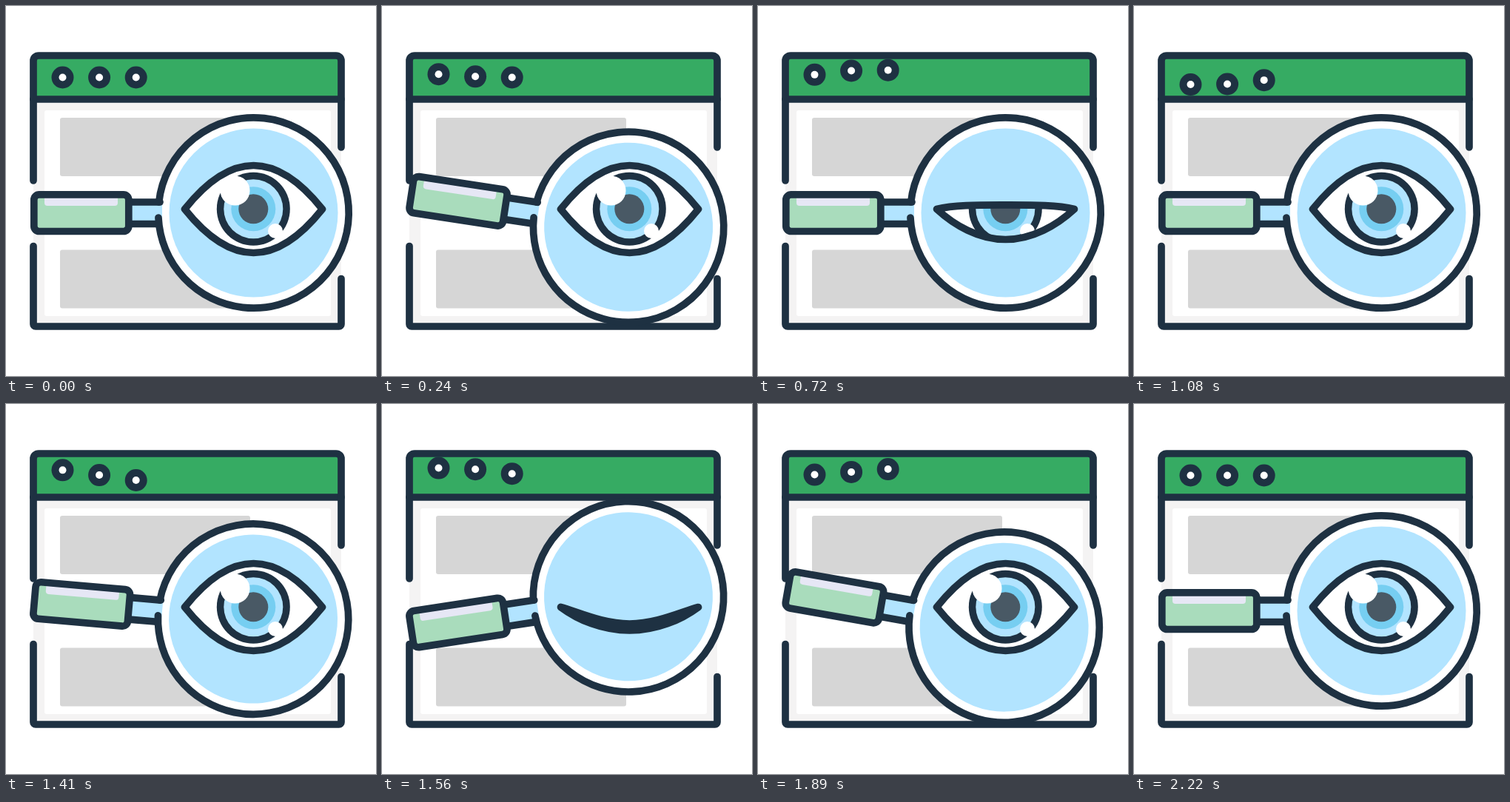
An HTML page with a canvas that plays this animation: 500 by 500 pixels, repeating every 2.25 s.

```html
<!DOCTYPE html>
<html lang="en">
<head>
<meta charset="utf-8">
<title>Search and view</title>
<style>
  html, body { margin: 0; width: 100%; height: 100%; overflow: hidden; background: #fff; }
  canvas { display: block; width: 500px; height: 500px; }
</style>
</head>
<body>
<canvas id="stage" width="500" height="500"></canvas>
<script>
const ctx = document.getElementById('stage').getContext('2d');
const LOOP = 2250, STEP = 30, ACTIVE = 2160;
const NAVY = '#1e3142', GREEN = '#36ab63', MINT = '#a9dcbc', SKY = '#b2e4ff',
      AQUA = '#76cef1', SLATE = '#495965', GREY = '#d6d6d6', PALE = '#f4f3f3', WHITE = '#fff';

const clamp01 = x => Math.min(1, Math.max(0, x));
const mix = (a, b, p) => a + (b - a) * p;
const ease = p => (1 - Math.cos(Math.PI * clamp01(p))) / 2;

// Eased value through [time, value] keys.
function track(keys, t) {
  for (let i = 1; i < keys.length; i++) {
    const [t0, v0] = keys[i - 1], [t1, v1] = keys[i];
    if (t < t1) return mix(v0, v1, ease((t - t0) / (t1 - t0)));
  }
  return keys[keys.length - 1][1];
}

const BOB = [[0, 0], [528, -10], [1032, 10], [1534, -10], [1980, 0]];
const BLINK = [[0, 0], [330, 0], [460, 1], [668, 1], [798, 0], [1080, 0]];

function tilt(t) {
  if (t >= ACTIVE) return 0;
  return -10 * Math.sin(2 * Math.PI * (t % 540) / 360) * Math.PI / 180;
}

function disc(x, y, r, color) {
  ctx.fillStyle = color;
  ctx.beginPath();
  ctx.arc(x, y, r, 0, 2 * Math.PI);
  ctx.fill();
}

function box(x, y, w, h, r, color) {
  ctx.fillStyle = color;
  ctx.beginPath();
  ctx.roundRect(x, y, w, h, r);
  ctx.fill();
}

function line(...points) {
  ctx.beginPath();
  points.forEach(([x, y]) => ctx.lineTo(x, y));
  ctx.stroke();
}

function drawWindow(t) {
  box(37, 67, 416, 366, 6, PALE);
  box(52, 141, 387, 278, 3, WHITE);
  box(73, 151, 257, 79, 3, GREY);
  box(73, 329.5, 257, 79, 3, GREY);
  box(37, 67, 416, 59, [7, 7, 0, 0], GREEN);

  line([37, 126], [453, 126]);
  ctx.beginPath();
  ctx.moveTo(37, 236);
  ctx.arcTo(37, 67, 60, 67, 7);
  ctx.arcTo(453, 67, 453, 90, 7);
  ctx.lineTo(453, 191);
  ctx.stroke();
  ctx.beginPath();
  ctx.moveTo(37, 324.5);
  ctx.arcTo(37, 433, 60, 433, 3);
  ctx.arcTo(453, 433, 453, 400, 3);
  ctx.lineTo(453, 368.5);
  ctx.stroke();

  for (let i = 0; i < 3; i++) {
    const x = 76.5 + 49.6 * i, y = 96.5 + track(BOB, t - 120 * i);
    disc(x, y, 15, NAVY);
    disc(x, y, 5, WHITE);
  }
}

function drawMagnifier(angle) {
  const cx = 334.5, cy = 279.5, deg = Math.PI / 180;
  ctx.save();
  ctx.translate(207, 280);
  ctx.rotate(angle);
  ctx.translate(-207, -280);

  disc(cx, cy, 129, WHITE);
  disc(cx, cy, 114, SKY);
  box(166, 265, 45, 29.5, 0, SKY);
  line([168, 265], [208, 265]);
  line([168, 294.5], [205, 294.5]);
  ctx.beginPath();
  ctx.arc(cx, cy, 128.7, 186.5 * deg, 537.1 * deg);
  ctx.stroke();

  box(37.8, 254.8, 128, 49.7, 7, MINT);
  box(52, 259, 99, 11, [0, 0, 4, 4], '#e6e7f5');
  ctx.beginPath();
  ctx.roundRect(37.8, 254.8, 128, 49.7, 7);
  ctx.stroke();
  ctx.restore();
}

function eyePath(shut) {
  const left = 241.5, right = 427.5, corner = 274.5, mid = 334.5;
  const mirror = x => 2 * mid - x;
  const top = mix(215.5, 297, shut), topSide = mix(245, 281, shut);
  const low = mix(333.5, 306, shut), lowSide = mix(304, 292, shut);
  ctx.beginPath();
  ctx.moveTo(left, corner);
  ctx.bezierCurveTo(265, topSide, 298, top, mid, top);
  ctx.bezierCurveTo(mirror(298), top, mirror(265), topSide, right, corner);
  ctx.bezierCurveTo(mirror(265), lowSide, mirror(298), low, mid, low);
  ctx.bezierCurveTo(298, low, 265, lowSide, left, corner);
  ctx.closePath();
}

function drawEye(shut) {
  const x = 334.3, y = 274.3;
  ctx.save();
  eyePath(shut);
  ctx.fillStyle = WHITE;
  ctx.fill();
  ctx.clip();
  disc(x, y, 49.5, NAVY);
  disc(x, y, 40, SKY);
  disc(x, y, 30, AQUA);
  disc(x, y, 20, SLATE);
  disc(309.5, 249.5, 20, WHITE);
  disc(364, 304, 10, WHITE);
  ctx.restore();
  eyePath(shut);
  ctx.stroke();
}

function draw(t) {
  ctx.fillStyle = WHITE;
  ctx.fillRect(0, 0, 500, 500);
  ctx.strokeStyle = NAVY;
  ctx.lineWidth = 9.7;
  ctx.lineCap = ctx.lineJoin = 'round';
  drawWindow(t);
  drawMagnifier(tilt(t));
  drawEye(track(BLINK, t % 1080));
}

const start = performance.now();
function tick() {
  const t = (performance.now() - start) % LOOP;
  draw(Math.floor(t / STEP) * STEP);
  requestAnimationFrame(tick);
}
tick();
</script>
</body>
</html>
```
